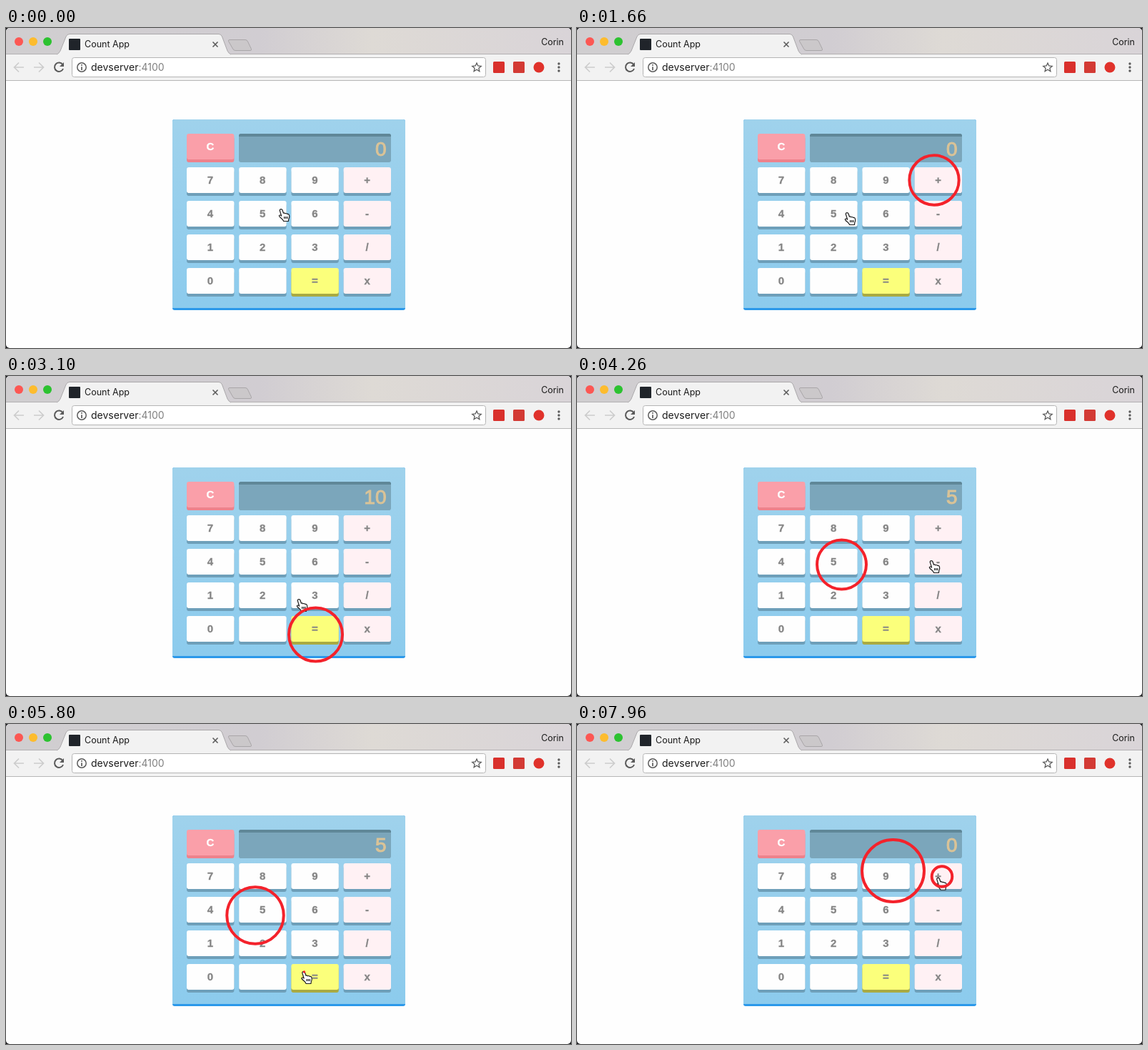
An HTML page for the animation above (8 s loop, 791 px wide and 448 px high).

```html
<!DOCTYPE html>
<html lang="en">
<head>
<meta charset="utf-8">
<title>Calculator</title>
<style>
  html, body { margin: 0; width: 100%; height: 100%; overflow: hidden; background: #16161a; }
  svg { display: block; width: 791px; height: 448px; }
  .ui { font-family: Inter, Roboto, sans-serif; fill: #1c1c1c; }
  .key { font: bold 15px "Liberation Sans", Arial, sans-serif; text-anchor: middle; stroke-width: .3; }
  #display { font: 28px "Liberation Sans", Arial, sans-serif; text-anchor: end; fill: #dac397; stroke: #dac397; }
</style>
</head>
<body>
<svg viewBox="0 0 791 448">
  <defs>
    <linearGradient id="strip">
      <stop offset="0" stop-color="#d0ced0"/>
      <stop offset=".45" stop-color="#d1cdd2"/>
      <stop offset=".65" stop-color="#dedad5"/>
      <stop offset="1" stop-color="#d9d4d8"/>
    </linearGradient>
    <linearGradient id="body" x2="0" y2="1">
      <stop offset="0" stop-color="#9fd2ec"/>
      <stop offset="1" stop-color="#8ccbed"/>
    </linearGradient>
    <clipPath id="window"><rect width="791" height="448" rx="5"/></clipPath>
    <clipPath id="panel"><rect x="326" y="148" width="213" height="40" rx="3"/></clipPath>
  </defs>

  <g clip-path="url(#window)">
    <rect width="791" height="448" fill="#fefefe"/>
    <rect width="791" height="37" fill="url(#strip)"/>
    <path d="M0 36.5H791" stroke="#b3b0b2"/>
    <rect y="37" width="791" height="36" fill="#f2f2f2"/>
    <path d="M0 73.5H791" stroke="#b6b6b6"/>
    <path d="M71 37Q74 36 76 32L84 12Q85.5 8.5 89 8.5H298Q301 8.5 302.5 12L310 32Q312 36 315 37"
      fill="#f2f2f2" stroke="#aaa8aa"/>
    <path d="M313 16.500H335Q337.5 16.5 338.5 19L343.5 29.5Q344 31.5 342 31.5H321Q318.5 31.5 317.5 29L311.5 18.5Q311 16.5 313 16.5Z"
      fill="#cbc8ca" stroke="#a9a6a8"/>
    <circle cx="18" cy="19" r="6" fill="#fc5753"/>
    <circle cx="38" cy="19" r="6" fill="#fdbc2e"/>
    <circle cx="58" cy="19" r="6" fill="#2cc230"/>
    <rect x="88" y="15" width="16" height="16" rx="1" fill="#20242a"/>
    <text class="ui" x="110" y="27" font-size="12.5">Count App</text>
    <text class="ui" x="781" y="24" font-size="12.5" text-anchor="end">Corin</text>
    <path d="M289.500 19.500l7 7m0-7l-7 7" stroke="#5c5c5c" stroke-width="1.6"/>

    <g fill="none" stroke-width="1.7">
      <path d="M25 55H11.5M18 48.5L11.5 55L18 61.5M39 55H52.5M46 48.5L52.5 55L46 61.5" stroke="#cdcdcd"/>
      <path d="M79.5 51.5A6.2 6.2 0 1 0 80 57" stroke="#5a5a5a" stroke-width="2"/>
    </g>
    <path d="M81 48V54H75Z" fill="#5a5a5a"/>
    <rect x="92.5" y="41.5" width="579" height="27" rx="3" fill="#fff" stroke="#b5b5b5"/>
    <circle cx="106" cy="55" r="6.2" fill="none" stroke="#5a5a5a" stroke-width="1.5"/>
    <path d="M106 51v1.8M106 54.2V59" stroke="#5a5a5a" stroke-width="1.7"/>
    <text class="ui" x="119" y="60" font-size="14">devserver<tspan fill="#808080">:4100</tspan></text>
    <path d="M659 49l1.8 4 4.4.4-3.3 2.900 1 4.300-3.900-2.300-3.900 2.300 1-4.300-3.300-2.900 4.400-.4Z"
      fill="none" stroke="#5a5a5a" stroke-width="1.3"/>
    <rect x="682" y="47" width="16" height="16" rx="1.5" fill="#d9302c"/>
    <rect x="710" y="47" width="16" height="16" rx="1.5" fill="#d33a34"/>
    <circle cx="746" cy="55" r="7.5" fill="#e0322b"/>
    <path d="M774 50v0m0 5v0m0 5v0" stroke="#5a5a5a" stroke-width="3.4" stroke-linecap="round"/>

    <rect x="233" y="128" width="326" height="267" rx="3" fill="#2b98ea"/>
    <path d="M236 128H556Q559 128 559 131V392H233V131Q233 128 236 128Z" fill="url(#body)"/>
    <g clip-path="url(#panel)">
      <rect x="326" y="148" width="213" height="40" fill="#7ba6bb"/>
      <rect x="326" y="148" width="213" height="4" fill="#5f8798"/>
    </g>
    <text id="display" x="532.5" y="179">0</text>
    <g id="keys"></g>
    <path id="hand" d="M-2.8 1.4Q-2.6-.4-1-.4Q.6-.4 1.1 1.200L2.400 5.200Q3.600 4.500 4.800 5.800Q6.400 5 7.600 6.400Q9.800 5.800 10.500 8.200Q11.200 11 9.800 13.500L9.400 16.500H2.600Q1.500 14-1 12Q-4 9.800-3.600 8.600Q-2.600 7.200-.4 9ZM3.600 10v3M5.700 10v3M7.800 10v3"
      fill="#fff" stroke="#1c1c1c" stroke-width="1.2" stroke-linejoin="round"/>
    <g id="rings" fill="none" stroke="#f4222b"></g>
  </g>
</svg>
<script>
const $ = id => document.getElementById(id);
const LOOP = 8000, RING_LIFE = 1300, RING_SIZE = 53, DWELL = 110, LAG = 40;

function add(parent, tag, attrs, text = "") {
  const el = document.createElementNS("http://www.w3.org/2000/svg", tag);
  for (const name in attrs) el.setAttribute(name, attrs[name]);
  el.textContent = text;
  return parent.appendChild(el);
}

function addKey(label, col, y, face, edge, ink) {
  const x = 253 + col * 73.2, box = { x, width: 66.4, height: 36, rx: 3 };
  add($("keys"), "rect", { ...box, y: y + 4, fill: edge });
  add($("keys"), "rect", { ...box, y, fill: face });
  add($("keys"), "text", { class: "key", x: x + 33, y: y + 23, fill: ink, stroke: ink }, label);
}

addKey("C", 0, 148, "#fa9fa9", "#ee828c", "#fff");
["789+", "456-", "123/", "0 =x"].forEach((row, r) => [...row].forEach((label, c) => {
  const equals = label === "=";
  const face = equals ? "#fbff7b" : c === 3 ? "#fff1f4" : "#fefefe";
  addKey(label, c, 195 + r * 47, face, equals ? "#a9aa42" : "#6e9fb9", "#858585");
}));

// Where the pointer goes: time, x, y, and the key it presses there, if any
const stops = [
  [0, 386, 254], [300, 363, 260, "5"], [975, 500, 213, "+"], [1690, 379, 259, "5"],
  [2345, 433.5, 362, "="], [2780, 610, 401], [3100, 411, 313], [3580, 370.5, 264, "5"],
  [4270, 497, 259, "-"], [4985, 349, 268, "5"], [5775, 417.5, 347, "="],
  [6560, 351, 223], [7035, 442.5, 205.5, "9"], [7690, 511, 213.5, "+"], [LOOP, 506, 216]
].map(([time, x, y, key]) => ({ time, x, y, key }));

const presses = stops.filter(stop => stop.key);

let shown = 0, held = 0, sign = 1;
for (const press of presses) {
  if (press.key === "=") shown = held + sign * shown;
  else if (press.key >= "0") shown = +press.key;
  else {
    held = shown;
    sign = press.key === "-" ? -1 : 1;
    shown = 0;
  }
  press.shown = shown;
  press.ring = add($("rings"), "circle", { cx: press.x, cy: press.y });
}

// The pointer rests around each press and eases from stop to stop
function pointerAt(t) {
  const i = stops.findIndex(stop => stop.time > t), a = stops[i - 1], b = stops[i];
  const leave = a.time + (a.key ? DWELL : 0), arrive = b.time - (b.key ? DWELL : 0);
  const u = Math.max(0, Math.min(1, (t - leave) / (arrive - leave)));
  const k = u * u * (3 - 2 * u);
  return [a.x + (b.x - a.x) * k, a.y + (b.y - a.y) * k];
}

function drawRing(ring, u) {
  const live = u >= 0 && u < 1;
  ring.setAttribute("visibility", live ? "visible" : "hidden");
  if (!live) return;
  const radius = RING_SIZE * (1 - (1 - u) ** 1.57), width = Math.min(4, radius);
  ring.setAttribute("r", radius - width / 2);
  ring.setAttribute("stroke-width", width);
  ring.setAttribute("opacity", Math.min(1, (1 - u) * 6));
}

function draw(t) {
  for (const { ring, time } of presses) drawRing(ring, (t - time) / RING_LIFE);
  const last = presses.filter(press => t >= press.time + LAG).pop();
  $("display").textContent = last ? last.shown : 0;
  $("hand").setAttribute("transform", `translate(${pointerAt(t)})`);
}

const begin = performance.now();
function tick() {
  draw((performance.now() - begin) % LOOP);
  requestAnimationFrame(tick);
}
tick();
</script>
</body>
</html>
```
